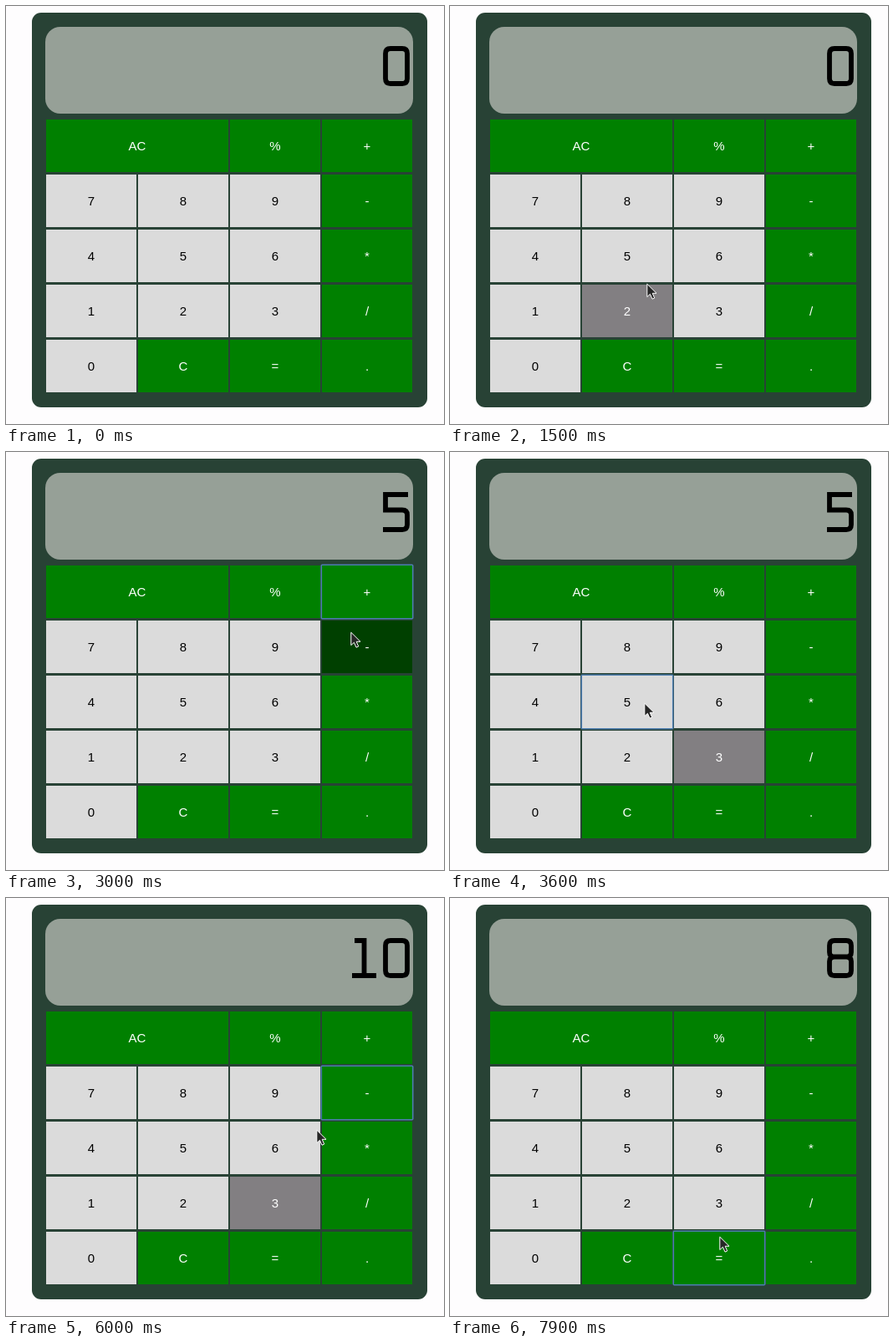
These frames come from a looping animation (524x501 px, 8 s). An HTML page:

```html
<!DOCTYPE html>
<html lang="en">
<head>
<meta charset="utf-8">
<title>Calculator</title>
<style>
html, body { margin: 0; width: 100%; height: 100%; overflow: hidden; background: #fefdfe; }
svg { display: block; width: 524px; height: 501px; }
text { font: 15px "Liberation Sans", Arial, sans-serif; text-anchor: middle; }
.num rect { fill: #dbdbdb; }
.op rect { fill: #008000; }
.op text, .hover text { fill: #fff; }
.num.hover rect { fill: #827f82; }
.op.hover rect { fill: #004000; }
#digits { fill: none; stroke: #000; stroke-width: 5.8; }
#ring { fill: none; stroke: #5a90d8; stroke-width: 1.6; opacity: .75; }
</style>
</head>
<body>
<svg viewBox="0 0 524 501">
  <rect x="31" y="8" width="473" height="473" rx="11" fill="#284235"/>
  <rect x="47" y="25" width="440" height="104" rx="18" fill="#96a097"/>
  <g id="digits"></g>
  <g id="keys"></g>
  <rect id="ring" height="64.4" rx="1"/>
  <path id="cursor" d="M.8 1.2V16.6L4.4 13.3L7 19.2L9.7 18L7.2 12.3H12Z" fill="#262626" stroke="#fff"/>
</svg>
<script>
const $ = id => document.getElementById(id);
const LOOP = 8000;

// Stroke shapes in a 39 px wide cell, y is on the stage
const glyphs = {
  0: 'M12 51H26Q32 51 32 57V87Q32 93 26 93H12Q6 93 6 87V57Q6 51 12 51Z',
  1: 'M8 51H19.5V93M5 93H34',
  2: 'M5 51H26Q32 51 32 57V64Q32 70 26 70H12Q6 70 6 76V93H34',
  5: 'M33 51H6V69.5H26Q32 69.5 32 75.5V87Q32 93 26 93H3',
  8: 'M12 51H26Q32 51 32 57V65Q32 70.5 26 70.5H12Q6 70.5 6 65V57Q6 51 12 51Z' +
     'M12 70.5H26Q32 70.5 32 76V87Q32 93 26 93H12Q6 93 6 87V76Q6 70.5 12 70.5Z'
};

const keys = {};
const rows = ['A A % +', '7 8 9 -', '4 5 6 *', '1 2 3 /', '0 C = .'];
rows.forEach((row, r) => row.split(' ').forEach((label, c) => {
  if (keys[label]) return;
  const wide = label === 'A', x = 48 + 110 * c, y = 136 + 66 * r, w = wide ? 218 : 108;
  const kind = /\d/.test(label) ? 'num' : 'op';
  $('keys').insertAdjacentHTML('beforeend',
    `<g class="${kind}"><rect x="${x}" y="${y}" width="${w}" height="63"/>` +
    `<text x="${x + w / 2}" y="${y + 37}">${wide ? 'AC' : label}</text></g>`);
  keys[label] = { x, y, w, el: $('keys').lastChild };
}));

// Tenths of a second, pointer x, y, hovered key, then on a click: focused key, display
const steps = [
  [0, -50, -50, '', '', '0'],
  [7, 150, 160, 'A'], [8, 182, 214, '8'], [9, 212, 262, '5'],
  [11, 215, 270, '5'], [12, 220, 284, '5'], [13, 226, 300, '5'], [14, 231, 317, '5'],
  [15, 235, 332, '2'], [16, 248, 350, '3'], [17, 278, 348, '6'], [18, 264, 322, '5'], [19, 238, 303, '5'],
  [20, 236, 301, '5', '5', '5'],
  [21, 250, 295, '6'], [22, 300, 268, '9'], [23, 376, 228, '-'], [24, 445, 191, '+'], [26, 445, 172, '+'],
  [28, 445, 172, '+', '+', '5'],
  [29, 442, 182, '-'], [30, 412, 215, '-'], [31, 352, 254, '6'], [32, 285, 284, '5'], [33, 240, 299, '5'],
  [34, 232, 300, '5', '5', '5'],
  [36, 232, 300, '3'], [37, 282, 348, '='], [38, 332, 398, '='], [39, 350, 416, '='],
  [41, 350, 416, '=', '=', '10'],
  [50, 351, 410, '='], [51, 354, 390, '3'], [52, 362, 350, '6'], [53, 378, 308, '*'],
  [54, 402, 272, '-'], [55, 422, 248, '-'], [56, 432, 238, '-'],
  [58, 432, 238, '-', '-', '10'],
  [59, 420, 246, '6'], [60, 371, 277, '3'], [61, 290, 328, '2'], [62, 228, 358, '2'],
  [64, 228, 358, '2', '2', '2'],
  [65, 250, 374, '='], [67, 308, 420, '='],
  [68, 310, 423, '=', '=', '8'],
  [71, 310, 424, '='], [78, 314, 420, '='], [79, 322, 405, '', '=', '8']
];
// Focus and display persist until the next click
steps.forEach((s, i) => { if (s.length < 6) s.push(...steps[i - 1].slice(4)); });

function show([, x, y, hover, focus, value]) {
  for (const label in keys) keys[label].el.classList.toggle('hover', label === hover);
  const k = keys[focus];
  $('ring').style.display = k ? '' : 'none';
  if (k) {
    $('ring').setAttribute('x', k.x - .7);
    $('ring').setAttribute('y', k.y - .7);
    $('ring').setAttribute('width', k.w + 1.4);
  }
  $('digits').innerHTML = [...value].map((d, i) =>
    `<path transform="translate(${448 - 39 * (value.length - 1 - i)} 0)" d="${glyphs[d]}"/>`).join('');
  $('cursor').setAttribute('transform', `translate(${x} ${y})`);
}

let last;
function tick() {
  const t = performance.now() % LOOP / 100;
  const now = steps.findLast(s => s[0] <= t);
  if (now !== last) show(last = now);
  requestAnimationFrame(tick);
}
tick();
</script>
</body>
</html>
```
